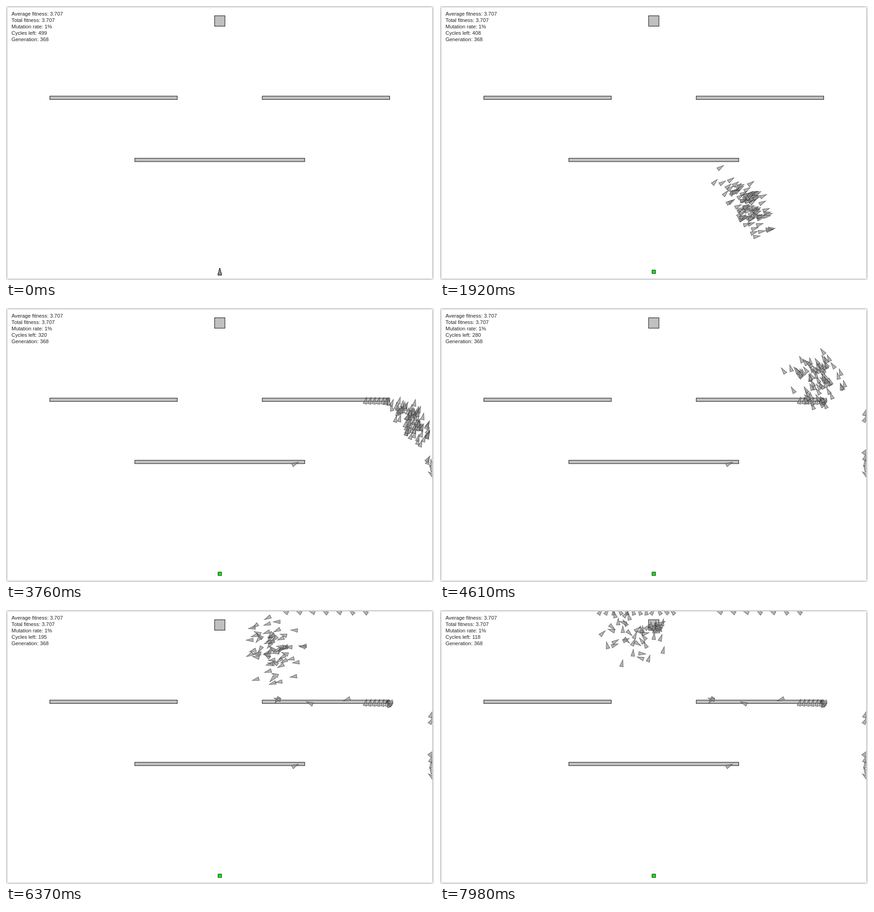
Write an HTML page with a canvas that moves like this. It is 934x600 px and loops after 8000 ms.

```html
<!DOCTYPE html>
<html lang="en">
<head>
<meta charset="utf-8">
<title>Evolving rockets</title>
<style>
  html, body { margin: 0; width: 100%; height: 100%; overflow: hidden; background: #f4f4f4; }
  canvas { display: block; }
</style>
</head>
<body>
<canvas id="stage" width="934" height="600"></canvas>
<script>
const ctx = document.getElementById('stage').getContext('2d');
const LOOP = 8000, STEP = 76.7, CYCLES_PER_STEP = 3.665;
const PANEL = { x: 3, y: 3, width: 927, height: 594 };
const PAD = { x: 466.5, y: 582 };
const RAD = Math.PI / 180;

let seed = 41;
function random() {
  seed = (seed * 1664525 + 1013904223) >>> 0;
  return seed / 4294967296;
}
const between = (a, b) => a + (b - a) * random();
const scatter = () => (random() + random() - 1) * 2.3;
const mix = (a, b, p) => a + (b - a) * p;
const clamp01 = p => Math.min(Math.max(p, 0), 1);
const smooth = p => p * p * (3 - 2 * p);

// Key poses of the swarm, in polar coordinates around the launch pad:
// time, radius, angle, radius spread, angle spread, heading, heading spread
const KEYS = [
  [0, 0, -52, 0, 0, -90, 0],
  [1150, 140, -43, 16, 11, -44, 5],
  [2610, 366, -34, 16, 6.5, -24, 8],
  [3760, 540, -39.5, 15, 3.4, -74, 7],
  [5370, 546, -63, 42, 3.8, -158, 15],
  [6370, 507, -77.4, 38, 4, -192, 24],
  [7980, 531, -96, 33, 4.4, -75, 55]
];

function slope(i, column) {
  const a = KEYS[Math.max(i - 1, 0)], b = KEYS[Math.min(i + 1, KEYS.length - 1)];
  return (b[column] - a[column]) / (b[0] - a[0]);
}

// Cubic interpolation of every column between the key poses
function swarmAt(time) {
  let i = 0;
  while (i < KEYS.length - 2 && time > KEYS[i + 1][0]) i++;
  const a = KEYS[i], b = KEYS[i + 1], span = b[0] - a[0];
  const p = clamp01((time - a[0]) / span), q = 1 - p;
  const [radius, angle, radiusSpread, angleSpread, heading, headingSpread] =
    [1, 2, 3, 4, 5, 6].map(c => mix(a[c], b[c], smooth(p)) +
      span * p * q * (slope(i, c) * q - slope(i + 1, c) * p));
  return { radius, angle, radiusSpread, angleSpread, heading, headingSpread };
}

const freeRocket = () => ({ out: scatter(), side: scatter(), turn: scatter() });

// A rocket that drifts out of its place in the swarm to end at a given spot
function crashingRocket(x, y, heading, time) {
  const swarm = swarmAt(time);
  const dx = x - PAD.x, dy = y - PAD.y;
  return {
    ...freeRocket(),
    crash: {
      x, y, heading, time,
      out: (Math.hypot(dx, dy) - swarm.radius) / swarm.radiusSpread,
      side: (Math.atan2(dy, dx) / RAD - swarm.angle) / swarm.angleSpread
    }
  };
}

const many = (count, make) => Array.from({ length: count }, (_, i) => make(i / (count - 1)));

// Crashes spread evenly from one [x, y, heading, time] to another
const crashLine = (count, from, to, wobble = 0) => many(count, p => {
  const [x, y, heading, time] = from.map((value, i) => mix(value, to[i], p));
  return crashingRocket(x, y, heading + wobble * scatter(), time);
});

const rockets = [
  crashingRocket(631, 341, -27, 2050),
  crashingRocket(744, 196, -200, 5200),
  crashingRocket(663, 204, -155, 5750),
  ...crashLine(2, [592, 197, -232, 6250], [592, 195, -165, 6300]),
  ...crashLine(6, [785, 203, -75, 3350], [832, 204, -75, 3650]),
  ...crashLine(5, [835, 206, -100, 3750], [837, 202, -190, 4300]),
  ...crashLine(5, [928, 364, -140, 3600], [928, 314, -50, 3900]),
  ...crashLine(2, [928, 243, -60, 4000], [928, 229, -70, 4050]),
  ...crashLine(7, [783, 4, -140, 5300], [609, 4, -150, 6350], 8),
  ...crashLine(12, [507, 4, -120, 6950], [350, 4, -80, 7900], 25),
  ...many(14, () => crashingRocket(between(461, 482), between(32, 44), between(-190, -70), between(6750, 7850))),
  ...many(38, freeRocket)
];

function poseOf({ out, side, turn, crash }, time, swarm) {
  if (crash) {
    if (time >= crash.time) return crash;
    const approach = smooth(clamp01(1 - (crash.time - time) / 1500));
    out = mix(out, crash.out, approach);
    side = mix(side, crash.side, approach);
  }
  const radius = swarm.radius + out * swarm.radiusSpread;
  const angle = (swarm.angle + side * swarm.angleSpread) * RAD;
  let heading = swarm.heading + side * swarm.angleSpread + turn * swarm.headingSpread;
  if (crash) heading = mix(heading, crash.heading, clamp01(1 - (crash.time - time) / 350));
  return {
    x: Math.min(PAD.x + radius * Math.cos(angle), 921),
    y: Math.max(PAD.y + radius * Math.sin(angle), 10),
    heading
  };
}

function drawRocket({ x, y, heading }) {
  ctx.save();
  ctx.translate(x, y);
  ctx.rotate(heading * RAD);
  ctx.beginPath();
  ctx.moveTo(8, 0);
  ctx.lineTo(-7, -4);
  ctx.lineTo(-7, 4);
  ctx.closePath();
  ctx.fillStyle = 'rgba(150,150,150,.7)';
  ctx.strokeStyle = 'rgba(45,45,45,.7)';
  ctx.fill();
  ctx.stroke();
  ctx.restore();
}

function box(centerX, centerY, width, height, color = '#c0c0c0') {
  const rect = [centerX - width / 2, centerY - height / 2, width, height];
  ctx.fillStyle = color;
  ctx.strokeStyle = '#000';
  ctx.fillRect(...rect);
  ctx.strokeRect(...rect);
}

// A bar between two fractions of the panel width
function bar(from, to, y) {
  box(PANEL.x + PANEL.width * (from + to) / 2, y, PANEL.width * (to - from), 7.4);
}

function panelPath() {
  ctx.beginPath();
  ctx.rect(PANEL.x, PANEL.y, PANEL.width, PANEL.height);
}

function drawPanel() {
  ctx.fillStyle = '#f4f4f4';
  ctx.fillRect(0, 0, 934, 600);
  ctx.save();
  ctx.shadowColor = 'rgba(0,0,0,.45)';
  ctx.shadowBlur = 5;
  ctx.fillStyle = '#fff';
  panelPath();
  ctx.fill();
  ctx.restore();
}

function drawStats(step) {
  ctx.fillStyle = '#222';
  ctx.font = '11.3px "Liberation Sans", Arial, sans-serif';
  [
    'Average fitness: 3.707',
    'Total fitness: 3.707',
    'Mutation rate: 1%',
    'Cycles left: ' + (499 - Math.floor(step * CYCLES_PER_STEP)),
    'Generation: 368'
  ].forEach((line, i) => ctx.fillText(line, 12, 21 + 14 * i));
}

function draw(time) {
  const step = Math.floor((time + 5) / STEP);
  const now = step * STEP;
  const swarm = swarmAt(now);
  drawPanel();
  drawStats(step);

  box(PAD.x, 32.8, 22.6, 22.8);
  bar(0.1, 0.4, 201);
  bar(0.6, 0.9, 201);
  bar(0.3, 0.7, 337.1);
  if (step > 0) box(PAD.x, PAD.y, 7.4, 7.4, '#0f0');

  ctx.save();
  panelPath();
  ctx.clip();
  for (const rocket of rockets) drawRocket(poseOf(rocket, now, swarm));
  ctx.restore();
}

const start = performance.now();
function tick() {
  draw((performance.now() - start) % LOOP);
  requestAnimationFrame(tick);
}
tick();
</script>
</body>
</html>
```
